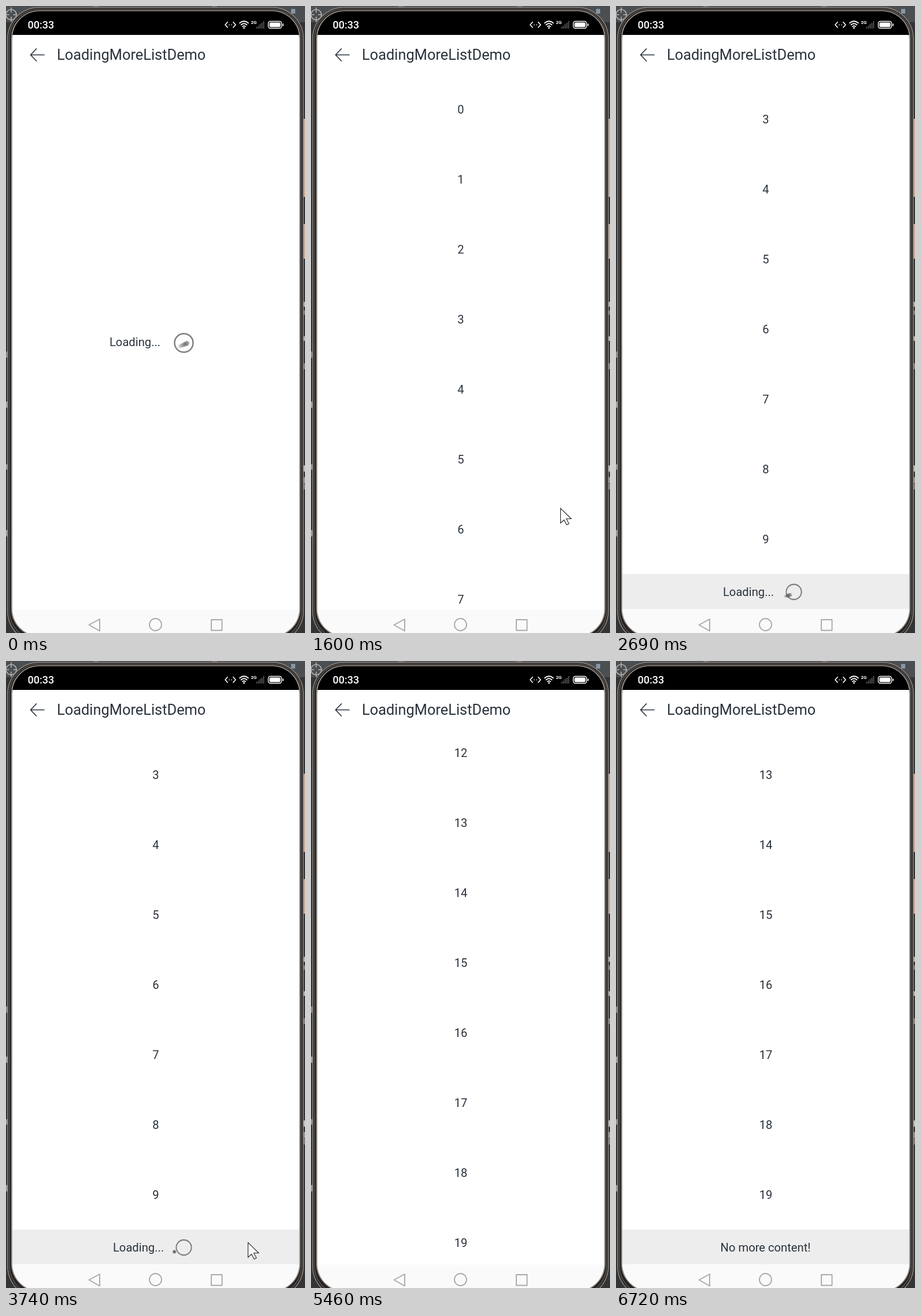
Recreate the animation shown at these times as an HTML page. Size 517x1084 px, loop 7 s.

```html
<!DOCTYPE html>
<html lang="en">
<head>
<meta charset="utf-8">
<title>LoadingMoreListDemo</title>
<style>
  html, body { margin: 0; width: 100%; height: 100%; overflow: hidden; background: #2b2b2b; }
  svg { display: block; width: 517px; height: 1084px; }
  text { font-family: Roboto, "Noto Sans", sans-serif; font-size: 20.2px; fill: #2a323c; }
  .mid { text-anchor: middle; }
  .title { font-size: 25.4px; }
  .clock { font-size: 18px; font-weight: 500; fill: #fff; }
  .net { font-size: 8px; font-weight: 700; fill: #fff; }
  .line { fill: none; stroke-linecap: round; stroke-linejoin: round; }
</style>
</head>
<body>
<svg viewBox="0 0 517 1084">
  <defs>
    <clipPath id="screenClip"><rect x="11" y="9" width="496" height="1080" rx="47"/></clipPath>
    <clipPath id="listClip"><rect x="11" y="118" width="496" height="925.5"/></clipPath>
  </defs>

  <!-- window behind the phone -->
  <rect width="517" height="1084" fill="#333435"/>
  <rect width="517" height="28" fill="#4c4f52"/>
  <g class="line" stroke="#b4b4b4" stroke-width="1.6">
    <circle cx="9" cy="15" r="9"/><path d="M9 3v8M9 19v8M-1 15h6M13 15h6"/>
  </g>
  <path d="M493 5h7v8h-7z" fill="#8797a8"/>
  <path d="M514 195h3v135h-3zM514 377h3v60h-3z" fill="#c8ab98"/>
  <g id="specks"></g>

  <!-- phone body -->
  <rect x="3" y="2.5" width="511" height="1098" rx="54" fill="#252322" stroke="#8f8882" stroke-width="1.5"/>
  <rect x="6" y="5.500" width="505" height="1091" rx="51" fill="none" stroke="#5a5551" stroke-width="1.5"/>
  <rect x="10" y="8.5" width="498" height="1081" rx="48" stroke="#9a9692" stroke-width="2"/>
  <path d="M151 1h9M356 1h9" stroke="#77716c" stroke-width="2"/>

  <g clip-path="url(#screenClip)">
    <rect x="11" y="9" width="496" height="42"/>
    <rect x="11" y="50" width="496" height="1040" fill="#fff"/>
    <g id="list" clip-path="url(#listClip)">
      <g id="items"></g>
      <g id="footer">
        <rect x="11" width="496" height="60.5" fill="#ededed"/>
        <text id="more" x="185" y="37.5">Loading...</text>
        <text id="end" class="mid" x="258.5" y="37.5">No more content!</text>
      </g>
    </g>
    <text id="first" x="179" y="588">Loading...</text>
    <g id="spin">
      <circle r="16" fill="none" stroke="#7f7f7f" stroke-width="2.5"/>
      <g id="comet" fill="#484848"></g>
    </g>
    <rect x="11" y="1043.5" width="496" height="46" fill="#fafafa"/>
    <g class="line" stroke="#a9a9a9" stroke-width="1.9">
      <path d="M143.5 1070 162 1060v20.5z"/>
      <circle cx="258.5" cy="1069.5" r="10.5"/>
      <path d="M355 1061h18.5v18.5h-18.5z"/>
    </g>
  </g>

  <!-- status bar and title -->
  <text class="clock" x="37.5" y="38.5">00:33</text>
  <g class="line" stroke="#fff" stroke-width="1.7">
    <path d="M383 28l-4 4.500 4 4.500M393 28l4 4.500-4 4.500M386 32.500h.1M390 32.500h.1"/>
    <path d="M404 29.500q7.500-6.500 15 0M406.500 32.500q5-4.500 10 0M409 35.500q2.500-2.200 5 0"/>
    <rect x="453.5" y="26.5" width="23" height="12" rx="3.5" stroke-width="1.4"/>
    <path d="M479 31v3"/>
  </g>
  <circle cx="411.5" cy="38" r="1.4" fill="#fff"/>
  <rect x="455.5" y="28.5" width="19" height="8" rx="2" fill="#fff"/>
  <text class="net" x="423.5" y="31">2G</text>
  <path d="M433.500 39v-3M436.500 39v-5M439.500 39v-8M442.500 39v-10M445.500 39v-13" stroke="#555" stroke-width="1.8"/>
  <path class="line" d="M66 84.500H42.500M52.500 74 42.500 84.500l10 10.500" stroke="#2a323c" stroke-width="1.7"/>
  <text class="title" x="88" y="93">LoadingMoreListDemo</text>

  <path id="cursor" d="M0 0V25.500L6 20l4.500 8.500 4-2-4.500-8.500h8.500z" fill="#fff" stroke="#222" stroke-width="1.1"/>
</svg>

<script>
const LOOP = 7000, STEP = 69.2, PITCH = 121;
const LIST_AT = 1050, MORE_AT = 3880;
const DOTS = 16;
const $ = id => document.getElementById(id);

function add(parent, tag, attrs) {
  const el = document.createElementNS("http://www.w3.org/2000/svg", tag);
  for (const k in attrs) el.setAttribute(k, attrs[k]);
  return parent.appendChild(el);
}
const show = (el, on) => el.style.display = on ? "" : "none";
const move = (el, x, y, k = 1) => el.setAttribute("transform", `translate(${x} ${y}) scale(${k})`);

const smooth = p => p * p * (3 - 2 * p);
const speedUp = p => p * p;

function tween(t, t0, t1, from, to, ease = smooth) {
  const p = Math.min(1, Math.max(0, (t - t0) / (t1 - t0)));
  return from + (to - from) * ease(p);
}
const settle = (end, over, dt) => end + over * Math.exp(-dt / 140);

// Bits of the code window peeking out on both sides
let seed = 7;
const random = () => (seed = seed * 16807 % 2147483647) / 2147483647;
for (let i = 0; i < 14; i++) {
  const grey = 90 + 110 * random();
  add($("specks"), "rect", {
    x: i % 3 ? 514 : 0, y: 450 + 500 * random(), width: 3, height: 6 + 5 * random(),
    fill: `rgb(${grey},${grey},${grey})`
  });
}

const items = Array.from({ length: 20 }, (_, n) => {
  const el = add($("items"), "text", { x: 259, y: 185.8 + PITCH * n, class: "mid" });
  el.textContent = n;
  return el;
});
const dots = Array.from({ length: DOTS }, () => add($("comet"), "circle", {}));

// Pointer stops: time, x, y; it rests beyond the edge when unseen
const stops = [
  [480, 530, 800], [1260, 431, 868], [1740, 431, 868], [2100, 405, 560], [2600, 525, 900],
  [3000, 530, 1015], [3600, 418, 1005], [4250, 418, 1005], [4490, 394, 612],
  [5100, 455, 1090], [5500, 440, 1090], [6000, 408, 777], [6450, 450, 1090]
];

function pointerAt(t) {
  const i = Math.max(1, stops.findIndex(s => s[0] > t));
  const last = t >= stops[stops.length - 1][0];
  const [a, b] = last ? stops.slice(-2) : [stops[i - 1], stops[i]];
  return [1, 2].map(c => tween(t, a[0], b[0], a[c], b[c]));
}

// Three drags: the first and last overshoot and spring back, the second is a fling
function scrollAt(t) {
  if (t < 2150) return tween(t, 1740, 2150, 0, 374);
  if (t < 4250) return settle(345, 29, t - 2150);
  if (t < 4490) return tween(t, 4250, 4490, 345, 646, speedUp);
  if (t < 5600) return 646 + 860 * (1 - Math.exp(-3.3 * (t - 4490) / 1000));
  if (t < 6000) return tween(t, 5600, 6000, 1484, 1617);
  return settle(1555, 62, t - 6000);
}

// Dots trailing along a narrow tilted orbit, fainter behind the ring
function drawComet(deg) {
  dots.forEach((dot, i) => {
    const j = DOTS - 1 - i;
    const a = (deg - j * 2.8) * Math.PI / 180;
    const depth = Math.cos(a), u = 24 * Math.sin(a), v = 3 * depth - 1;
    dot.setAttribute("cx", 2 + u * 0.914 + v * 0.407);
    dot.setAttribute("cy", -u * 0.407 + v * 0.914);
    dot.setAttribute("r", 3.5 + 0.7 * depth - j * 0.05);
    dot.setAttribute("opacity", 0.22 * (1 - j / DOTS) * (depth > 0 ? 1 : 0.35));
  });
}

function draw(t) {
  const ready = t >= LIST_AT, full = t >= MORE_AT;
  const count = full ? 20 : 10;
  const s = Math.round(scrollAt(t));
  const top = 118 + PITCH * count - s;

  show($("list"), ready);
  show($("first"), !ready);
  move($("items"), 0, -s);
  items.forEach((el, n) => show(el, n < count));
  move($("footer"), 0, top);
  show($("more"), !full);
  show($("end"), full);

  show($("spin"), !ready || (!full && top < 1043));
  if (!ready) move($("spin"), 307.5, 582.5);
  else move($("spin"), 307.5, top + 31, 0.82);
  drawComet(ready ? -28 + (t - 2699) * 0.3 : 9 + t * 0.3);

  const [x, y] = pointerAt(t);
  move($("cursor"), Math.round(x) + 0.5, Math.round(y) + 0.5);
}

const start = performance.now();
function tick(now) {
  const t = Math.max(0, now - start) % LOOP;
  draw(Math.floor((t + 10) / STEP) * STEP);
  requestAnimationFrame(tick);
}
draw(0);
requestAnimationFrame(tick);
</script>
</body>
</html>
```
